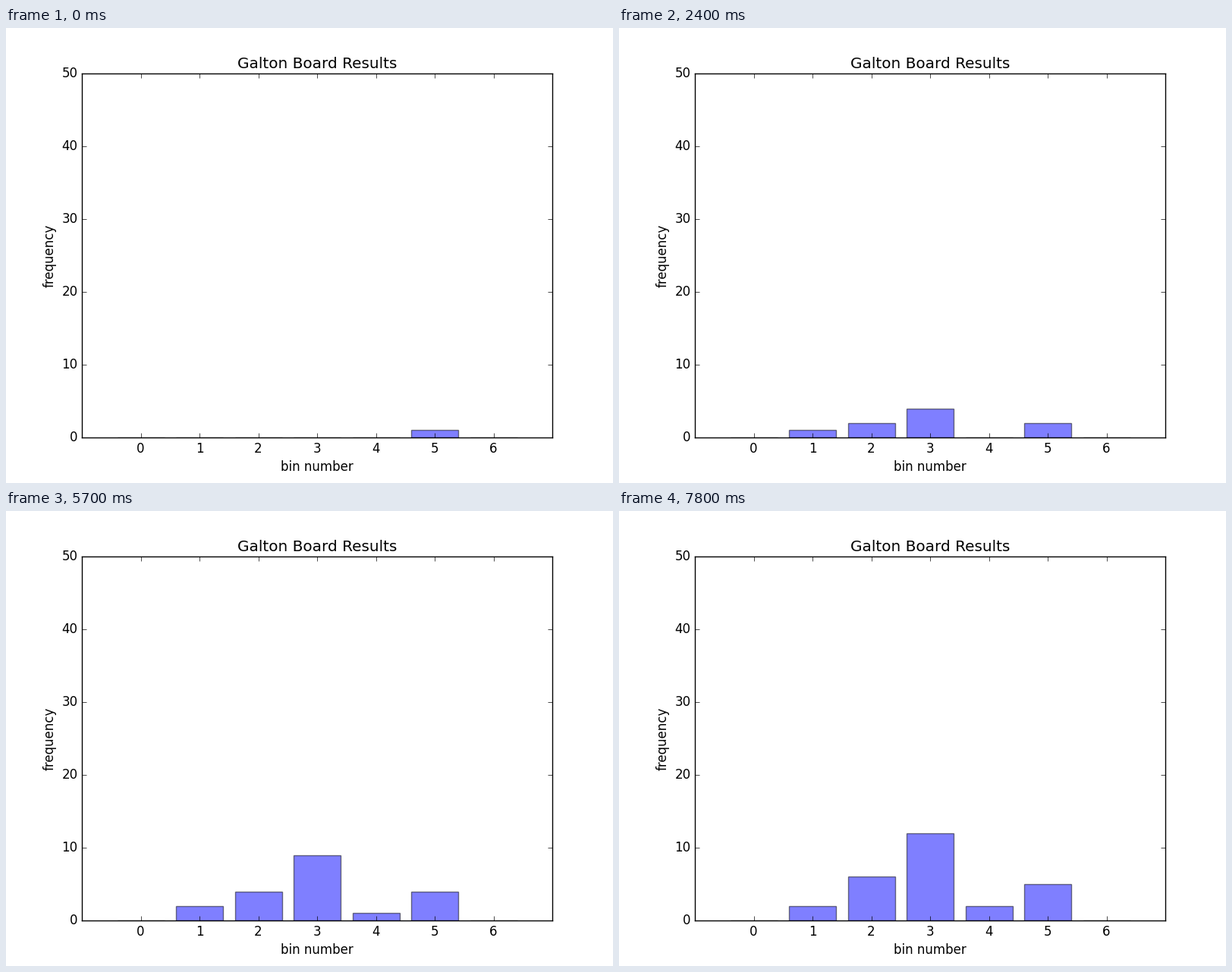
These frames come from a looping animation (800x600 px, 8 s). A matplotlib script:

```python
import matplotlib.pyplot as plt
import numpy as np
from matplotlib.animation import FuncAnimation

plt.style.use("classic")
plt.rcParams["font.family"] = "DejaVu Sans"

BINS = 7
INTERVAL = 100        # ms per animation frame
FRAMES = 80
FRAMES_PER_BALL = 3   # a new ball lands every 300 ms

# Bin in which each successive ball lands.
LANDINGS = [5, 3, 1, 3, 5, 3, 2, 3, 2, 3, 1, 5, 4, 2,
            5, 3, 3, 3, 2, 3, 4, 3, 2, 3, 2, 5, 3]

fig, ax = plt.subplots(figsize=(8, 6), dpi=100, facecolor="white")
ax.set_xlim(-1, BINS)
ax.set_ylim(0, 50)
ax.set_xticks(range(BINS))
ax.set_title("Galton Board Results")
ax.set_xlabel("bin number")
ax.set_ylabel("frequency")
bars = ax.bar(range(BINS), np.zeros(BINS), width=0.8, align="center",
              color="blue", edgecolor="black", linewidth=1, alpha=0.5)


def update(frame):
    landed = LANDINGS[:frame // FRAMES_PER_BALL + 1]
    for bar, count in zip(bars, np.bincount(landed, minlength=BINS)):
        bar.set_height(count)
    return bars.patches


anim = FuncAnimation(fig, update, frames=FRAMES, interval=INTERVAL,
                     repeat=True, repeat_delay=0, blit=False)
plt.show()
```
